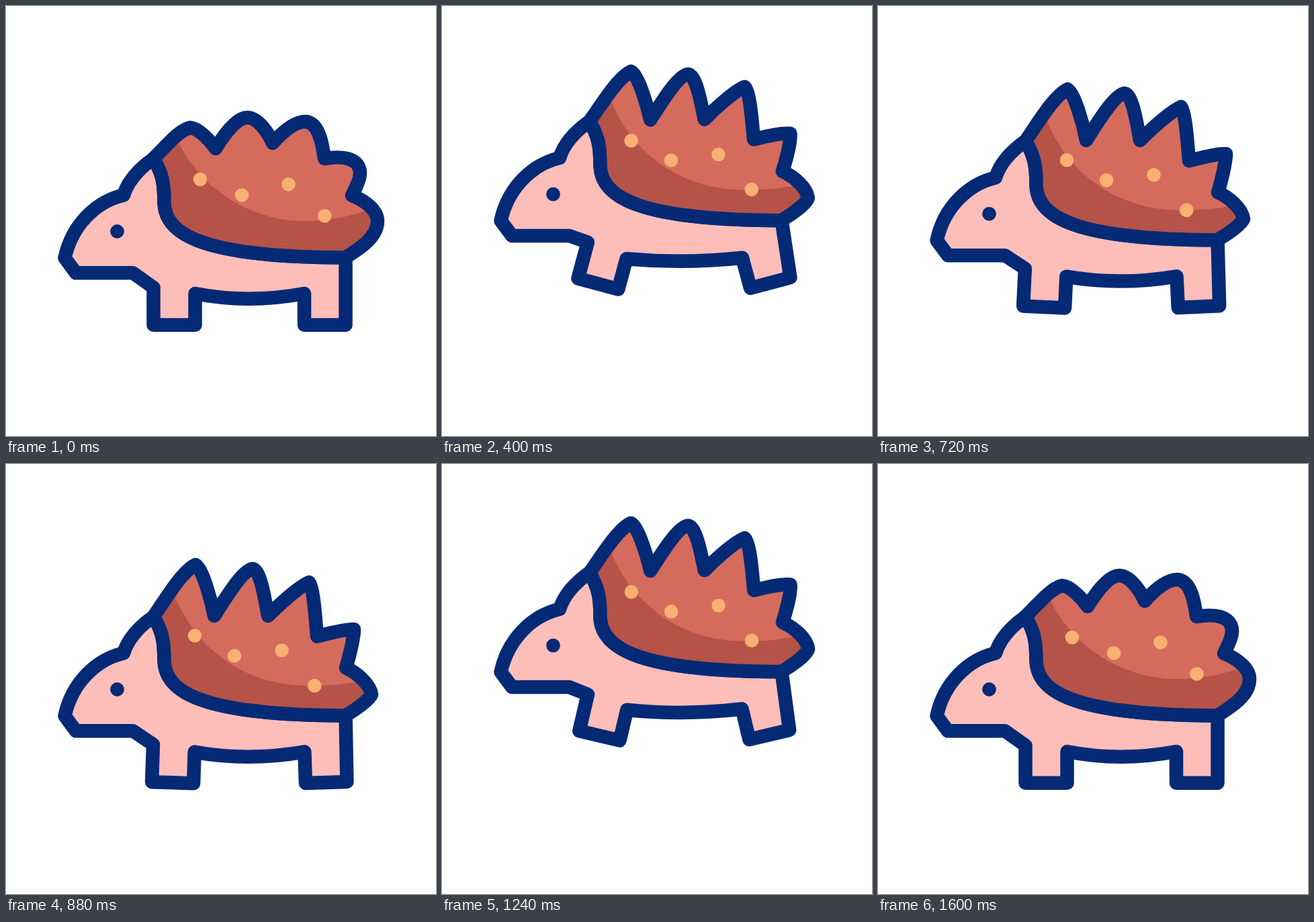
Animation of 640 by 640 pixels, one loop 2000 ms. Source, as an HTML page:

```html
<!DOCTYPE html>
<html lang="en">
<head>
<meta charset="utf-8">
<title>Jumping hedgehog</title>
<style>
  html, body { margin: 0; height: 100%; overflow: hidden; background: #fff; }
  svg { display: block; width: 100vw; height: 100vh; }
  .line { stroke: #042a76; stroke-width: 20.5; stroke-linejoin: round; stroke-linecap: round; }
</style>
</head>
<body>
<svg viewBox="0 0 640 640">
  <clipPath id="clip"><path class="shell"/></clipPath>
  <g id="animal">
    <path id="body" class="line" fill="#fdbeb9"/>
    <path class="shell" fill="#b55348"/>
    <path id="light" fill="#d56b5d" clip-path="url(#clip)"/>
    <g id="dots" fill="#f9b072"></g>
    <path class="shell line" fill="none"/>
    <circle cx="165.5" cy="335.5" r="10.4" fill="#042a76"/>
  </g>
</svg>
<script>
const LOOP = 2000;
const $ = id => document.getElementById(id);

// Each pair holds the relaxed and the bristled form of the same path.
const BACK = 'C292 374 237 340 235.5 293C235.5 265 233 249 219.5 227';
const SHELL = [
  'M219.5 227C238 209 257 185 274 181C286 182 302 198 312 212C326 189 344 166 359 166C374 166 389 186 397 204' +
  'C412 187 430 172 446 172C466 174 471 205 474 227C487 225 512 222 523 236C533 249 522 267 515 282' +
  'C535 290 553 304 553 320C553 345 525 362 505 374.5',
  'M219.5 227C234 207 261 160 282 150C292 154 305 201 310 226C323 206 351 158 367 156C379 157 386 205 390 226' +
  'C405 211 434 184 451 176C458 184 461 235 463 256.5C478 253 500 246 518 246C518 258 511 287 506 303.5' +
  'C523 311 542 328 544 343C542 350 520 366 505 374.5'
];
const LIGHT = [
  'M250 188C281 268 362 320 443 320C480 320 515 314 560 296V100H250Z',
  'M245 180C275 271 352 330 450 330C480 330 510 329 560 316V100H245Z'
];
const DOTS = [
  [[289, 258], [281, 255.5]],
  [[351, 281.5], [340, 285.5]],
  [[420.5, 265.5], [410.5, 277.5]],
  [[474.5, 312.5], [459.3, 330]]
];

const dots = DOTS.map(() => {
  const dot = document.createElementNS('http://www.w3.org/2000/svg', 'circle');
  dot.setAttribute('r', 10.3);
  return $('dots').appendChild(dot);
});

const lerp = (a, b, p) => a + (b - a) * p;
const clamp = u => Math.min(1, Math.max(0, u));
const setPath = (el, d) => el.setAttribute('d', d);

function morph([from, to], p) {
  const target = to.match(/[\d.]+/g);
  let i = 0;
  return from.replace(/[\d.]+/g, n => lerp(+n, +target[i++], p).toFixed(2));
}

// Leaves the ground at full speed and slows down towards the top.
function hop(t, start, peak, end) {
  const u = clamp(t < peak ? (t - start) / (peak - start) : (end - t) / (end - peak));
  return u + u * u - u * u * u;
}

function rotate(points, [cx, cy], degrees) {
  const a = degrees * Math.PI / 180, c = Math.cos(a), s = Math.sin(a);
  return points.map(([x, y]) => [cx + (x - cx) * c - (y - cy) * s, cy + (x - cx) * s + (y - cy) * c]);
}

function bodyPath(angle) {
  const front = rotate([[219.5, 419], [219.5, 474.8], [281.5, 474.8], [281.5, 428]], [264, 403], angle);
  const hind = rotate([[444, 428], [444, 474.8], [505.5, 474.8]], [453.5, 418], -angle);
  return `M175 281.5C134 291 98 326 87.5 375L104 397.3H189L${front.join('L')}` +
    `Q360 ${443.5 - angle * 0.27} ${hind.join('L')}L505.5 374.5${BACK}C194 245 181 262 175 281.5Z`;
}

function draw(t) {
  const height = 66.8 * (hop(t, 179, 505, 823) + hop(t, 885, 1207, 1530));
  const angle = 16.2 * (hop(t, 161, 463, 766) + hop(t, 849, 1143, 1440));
  const bristle = clamp(t / 440) - clamp((t - 1198) / 402);

  $('animal').setAttribute('transform', `translate(0 ${-height})`);
  setPath($('body'), bodyPath(angle));
  const shell = morph(SHELL, bristle);
  document.querySelectorAll('.shell').forEach(el => setPath(el, shell + BACK + 'Z'));
  setPath($('light'), morph(LIGHT, bristle));
  dots.forEach((dot, i) => {
    const [a, b] = DOTS[i];
    dot.setAttribute('cx', lerp(a[0], b[0], bristle));
    dot.setAttribute('cy', lerp(a[1], b[1], bristle));
  });
}

function tick() {
  draw(performance.now() % LOOP);
  requestAnimationFrame(tick);
}
tick();
</script>
</body>
</html>
```
